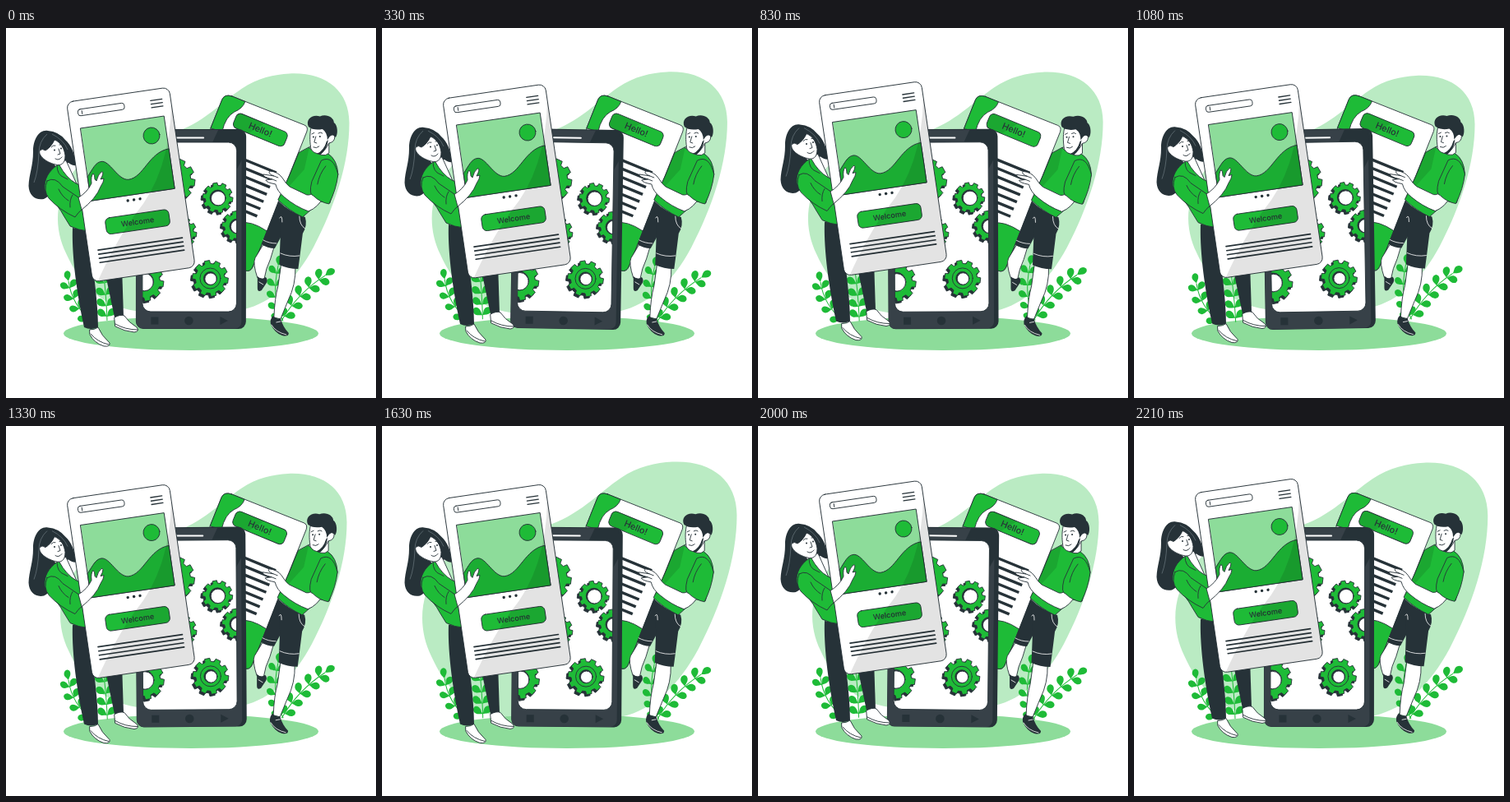
Recreate the animation shown at these times as an HTML page. Size 450 by 450 pixels, loop 2250 ms.

```html
<!DOCTYPE html>
<html lang="en">
<head>
<meta charset="utf-8">
<title>App design</title>
<style>
html, body { margin: 0; width: 100%; height: 100%; overflow: hidden; background: #fff; }
svg { display: block; width: 100%; height: 100%; }
text { font: 500 9.1px Inter, "Open Sans", sans-serif; text-anchor: middle; fill: #263238; }
.d { fill: #263238; }
.g { fill: #1ebb37; }
.w { fill: #fff; }
.o { stroke: #263238; stroke-width: .9; stroke-linejoin: round; stroke-linecap: round; }
.l { fill: none; stroke: #263238; stroke-width: .9; stroke-linecap: round; stroke-linejoin: round; }
.p { fill: none; stroke: #fff; stroke-width: .8; stroke-linecap: round; }
.s { fill: #000; opacity: .11; }
</style>
</head>
<body>
<svg viewBox="0 0 450 450">
  <defs>
    <clipPath id="screen"><rect x="166" y="139" width="114.5" height="206" rx="10"/></clipPath>
    <clipPath id="page"><rect width="126" height="221" rx="8"/></clipPath>
  </defs>

  <path id="blob" fill="#baebc3" d="M343 58C386 56 414.500 78 414.500 117C414.500 165 397 217 372 265C350 306 322 332 288 340C255 350 200 347 160 342C115 335 92 308 76 273C62 244 61 208 85 175C110 140 155 141 203 129C238 119 262 92 286 76C305 63 325 59 343 58Z"/>
  <ellipse cx="225" cy="371.5" rx="155" ry="20.5" fill="#8ddc9a"/>
  <g id="plants"></g>

  <g id="man">
    <path class="w o" d="M275 83L363 118Q368 120 366 126L300 291Q297 297 291 295L240 270L249 122L263 87Q266 80 275 83Z"/>
    <path class="g o" d="M275 83L291 89.500Q288 98 278 102Q267 108 263 126L249 122L263 87Q266 80 275 83Z"/>
    <path class="g o" d="M285 237Q298 234 317.5 247L300 291Q297 297 291 295L285 290Z"/>
    <g id="rows"></g>
    <g transform="translate(309.5 124) rotate(22.5)">
      <rect class="g o" x="-33.5" y="-9.5" width="67" height="19" rx="5.5"/>
      <path class="s" d="M-33 -4Q-33 -9.500 -28 -9.500H2L-12 9.500H-28Q-33 9.500 -33 4Z"/>
      <text y="3.5" style="font-size:10.800px">Hello!</text>
    </g>
    <path class="w o" d="M313 264L326 267Q322 282 317 293L314 306L306 304Q300 286 303 280Z"/>
    <path class="d" d="M306 302Q311 307 316 303Q319 306 317 310L311 319Q306 322 306 316Z"/>
    <path class="p" d="M308 309L313 312"/>
    <path class="w o" d="M335 288L352 290Q353 312 343 332L334 354L326 352Q327 328 331 314Z"/>
    <path class="d" d="M325 350Q329 355 334 353Q337 364 344 371Q344 376 336 374Q327 371 322 360Q321 354 325 350Z"/>
    <path class="p" d="M323 361Q328 370 341 373M329 358L334 357"/>
    <path class="d" d="M331 211L311 263Q318 268 327 268L340 244Z"/>
    <path class="d" d="M331 210Q345 224 364 230Q367 240 361 250L357.500 278L355.500 293Q343 293 332.500 288L334 250Z"/>
    <path class="p" d="M334 274Q345 279 357 277M313 258Q320 262 329 262M336 236Q336 226 333 231M357 229Q357 240 364 244"/>
    <path class="g o" d="M369 145L392 153Q403 160 404 178L394 213L383 211L370 222L361 230Q344 222 331 209L345 179L356 152Z"/>
    <path class="s" d="M369 145L363 172L344 193L331 209L345 179L356 152Z"/>
    <path class="w o" d="M372 143L393 136L393 152Q386 160 369 146Z"/>
    <path class="w o" d="M371 122C369 132 370 140 371 147Q374 153 382 153Q388 150 393 140Q400 139 400 132Q398 128 393 131L390 124Q385 120 378 122Z"/>
    <path class="d" d="M392 136Q391 147 383 154L378 153Q387 149 390 138Z"/>
    <path class="d" d="M368 120C364 111 373 104.500 382 107.500C390 104 399 109 399 115C404 118 404 130 401 133Q398 128 394 132L391 136Q391 127 385 123Q374 125 368 120Z"/>
    <path class="l" d="M372 129L375 127.500M380 128Q383 126 385 128M377 132L375 139L378 140M374 145Q378 147 381 144"/>
    <circle class="d" cx="374" cy="132.500" r="1"/><circle class="d" cx="382" cy="132" r="1"/>
    <path class="w o" d="M386 206Q380 218 368 223Q352 217 339 206Q330 199 328 190Q317 188 316 185L324 184Q312 181 313 178L326 180Q318 177 321 174Q331 175 336 182Q341 190 345 193L366 203Q372 204 375 198Z"/>
    <path class="l" d="M326 180L331 182M324 184L329 186"/>
    <path class="g o" d="M384 161Q398 154 404 178Q402 196 393 214Q382 212 374 204Q368 203 372 187Z"/>
    <path class="l" d="M389 168Q381 178 379 190"/>
  </g>

  <g id="phone">
    <rect class="d" x="158" y="123" width="134" height="243" rx="9"/>
    <rect x="158.500" y="124" width="128" height="241.500" rx="8" fill="#374148"/>
    <path class="d" d="M258 124H283Q287 124 287 132V160L280.500 172V150Q280 139 270 139H251Z"/>
    <path class="p" d="M207 133.500H240" style="stroke-width:2"/>
    <rect class="w" x="166" y="139" width="114.500" height="206" rx="10"/>
    <g id="gears" clip-path="url(#screen)"></g>
    <rect class="l" x="166" y="139" width="114.500" height="206" rx="10"/>
    <rect class="d" x="176.500" y="351.500" width="9" height="9"/>
    <circle class="d" cx="222.500" cy="356" r="5.300"/>
    <path class="d" d="M260.500 351L270 356L260.500 361Z"/>
  </g>

  <g id="woman">
    <path class="d" d="M118 285L132 352L143 351L141 290Z"/>
    <path class="w o" d="M132 352Q139 348 144 350Q149 358 159 364Q163 369 156 370Q144 369 133 363Z"/>
    <path class="l" d="M133 360Q145 367 160 367"/>
    <path class="d" d="M81 243C80 270 84 312 95 364Q103 368 112 364C112 340 108 310 107 300L104 247Z"/>
    <path class="w o" d="M102 367Q108 367 112 364Q116 374 126 383Q127 388 119 387Q107 383 102 373Z"/>
    <path class="l" d="M103 372Q111 382 125 385"/>
    <path class="d" d="M51 125C40 123 33 136 33 150C33 168 28 178 27.500 192C28 204 36 210 46 208C54 205 56 196 58 188L66 166L76 164Q82 168 85 167C84 154 80 143 72 136Q64 126 51 125Z"/>
    <path fill="none" stroke="#78858b" stroke-width=".6" d="M50 129Q40 138 40 152Q39 175 34 188M56 129Q70 136 75 148"/>
    <path class="w o" d="M56 163L73 161L87 192L72 181L60 168Z"/>
    <path class="g o" d="M62 167C52 174 46 184 47 196C49 206 62 212 70 228L78 241Q88 246 100 247L92 192L85 189Q73 182 65 167Z"/>
    <path class="l" d="M62 167Q62 179 71 182L75 184"/>
    <path class="w o" d="M59 136C67 139 71 147 72 155C72 165 67 168 60 166C48 163 39 155 41 149Q44 146 48 149Q55 145 59 136Z"/>
    <path class="l" d="M55 145Q57 142 60 143M65 142L68 141.500M64 147L66 153L63 154M60 159Q64 162 68 157"/>
    <circle class="d" cx="59" cy="148.500" r="1"/><circle class="d" cx="67" cy="146.500" r="1"/>

    <g id="card" transform="translate(73.500 90.300) rotate(-8.350)">
      <rect class="w o" width="126" height="221" rx="8"/>
      <rect class="w o" x="12" y="10.800" width="57" height="8" rx="3"/>
      <path class="l" d="M17 12.800V16.800"/>
      <path class="l" d="M101.500 13H115.500M101.500 17.300H115.500M101.500 21.600H115.500" style="stroke-width:1.300"/>
      <rect class="o" x="12.500" y="33.800" width="102.500" height="89.200" fill="#8ddc9a"/>
      <circle class="g o" cx="96.500" cy="55.300" r="10"/>
      <path class="o" fill="#1bad33" d="M12.500 93C20 85 24 77.500 31.500 77.500C42 77.500 48 103 61 104C80 104 90 75 115 74V123H12.500Z"/>
      <g class="d"><circle cx="56.500" cy="129.300" r="1.700"/><circle cx="64" cy="129.300" r="1.700"/><circle cx="71.500" cy="129.300" r="1.700"/></g>
      <rect class="g o" x="25.500" y="146.500" width="78" height="20" rx="5.500"/>
      <text x="64.500" y="159.700">Welcome</text>
      <path class="l" d="M12 183.500H115.500M12 188.600H115.500M12 193.700H115.500M12 198.800H115.500" style="stroke-width:1.700"/>
      <path class="s" clip-path="url(#page)" d="M126 20Q112 104 62 148Q34 177 6 221H126Z"/>
    </g>

    <path class="w o" d="M87 207Q99 200 104 189Q103 180 106 177Q108 178 108 184L110 186Q112 178 116 175Q119 174 117 180L115 184L119 183Q119 187 115 193Q110 207 91 222Z"/>
    <path class="g o" d="M50 186Q60 180 69 193L88 206L92 221Q88 224 84 230Q66 222 52 207Q45 198 50 186Z"/>
    <path class="l" d="M81 203Q77 209 78 218M64 196Q68 205 76 210"/>
  </g>
</svg>

<script>
const $ = id => document.getElementById(id);
const GREEN = '#1ebb37', DARK = '#263238';

// Leaves in pairs along a quadratic stem
function plant([ax, ay], [bx, by], [cx, cy], pairs, size) {
  const mix = (a, b, c, t) => (1 - t) ** 2 * a + 2 * t * (1 - t) * b + t * t * c;
  const leaf = (x, y, deg, s) =>
    `<path fill="${GREEN}" transform="translate(${x} ${y}) rotate(${deg}) scale(${s})" d="M0 0C.25 -.12 .35 -.36 .65 -.36Q1 -.32 1.050 0Q1 .28 .7 .3C.4 .3 .25 .1 0 0Z"/>`;
  let out = `<path d="M${ax} ${ay}Q${bx} ${by} ${cx} ${cy}" fill="none" stroke="${GREEN}" stroke-width="1"/>`;
  for (let i = 0; i <= pairs; i++) {
    const t = i === pairs ? 1 : (i + .4) / pairs;
    const x = mix(ax, bx, cx, t), y = mix(ay, by, cy, t);
    const dx = (1 - t) * (bx - ax) + t * (cx - bx), dy = (1 - t) * (by - ay) + t * (cy - by);
    const deg = Math.atan2(dy, dx) * 180 / Math.PI;
    out += i === pairs ? leaf(x, y, deg, size) : leaf(x, y, deg - 52, size) + leaf(x, y, deg + 52, size);
  }
  return out;
}

function gear(x, y, r, hole, ring) {
  const n = 10, pts = [];
  for (let i = 0; i < n; i++)
    for (const [off, k] of [[-.32, .82], [-.23, 1], [.23, 1], [.32, .82]]) {
      const a = (i + off + .2) * 2 * Math.PI / n;
      pts.push((r * k * Math.cos(a)).toFixed(2) + ' ' + (r * k * Math.sin(a)).toFixed(2));
    }
  const d = 'M' + pts.join('L') + 'Z';
  const circle = (cx, cy, rad, fill) => `<circle class="o" cx="${cx}" cy="${cy}" r="${rad}" fill="${fill}"/>`;
  return `<g transform="translate(${x} ${y})">
    <path class="d o" transform="translate(-2 2.300)" d="${d}"/>
    <path class="o" fill="${GREEN}" d="${d}"/>
    ${ring ? circle(0, 0, ring, GREEN) : ''}${circle(0, 0, hole, DARK)}${circle(.6, .6, hole - .8, '#fff')}</g>`;
}

$('plants').innerHTML =
  plant([104, 356], [80, 337], [76, 308], 4, 12) +
  plant([123, 356], [122, 320], [115, 270], 6, 13) +
  plant([337, 356], [322, 330], [331, 289], 5, 12) +
  plant([335, 356], [355, 322], [388, 301], 5, 13);

$('gears').innerHTML =
  gear(203, 185, 27, 11) + gear(213, 249, 19, 8) + gear(257.5, 206.5, 18.5, 9.5) +
  gear(281, 241, 18.5, 9) + gear(168, 308.5, 24, 11.5) + gear(248.5, 304.5, 22, 8, 12.5);

for (let i = 0; i < 7; i++) {
  const y = 158 + 10.4 * i, end = 329 - 3.9 * i;
  $('rows').innerHTML += `<path d="M285 ${y}L${end} ${y + .41 * (end - 285)}" stroke="${DARK}" stroke-width="3.400"/>`;
}

// [fraction of cycle, value]
const BEAT = [[0, 1], [.1, 1.1], [.3, 1], [.4, 1], [.5, 1.1], [.6, 1], [1, 1]];
const SWAY = [[0, 0], [.25, 1], [.75, -1], [1, 0]];
const FLOAT = [[0, 0], [.5, -9], [1, 0]];
const SHAKE = [[0, 0], [.1, -.9], [.2, 1.8], [.3, -3.6], [.4, 3.6], [.5, -3.6],
  [.6, 3.6], [.7, -3.6], [.8, 1.8], [.9, -.9], [1, 0]];
const LOOP = 2250, CYCLE = 1500, LEAD = 25;

function at(keys, p) {
  const i = Math.max(1, keys.findIndex(k => k[0] >= p));
  const [a, u] = keys[i - 1], [b, v] = keys[i];
  return u + (v - u) * (p - a) / (b - a);
}

const move = (id, value) => $(id).setAttribute('transform', value);

function draw(ms) {
  const p = (ms % LOOP + LEAD) % CYCLE / CYCLE;
  const sway = at(SWAY, p), x = at(SHAKE, p);
  move('blob', `translate(240.500 205) scale(${at(BEAT, p)}) translate(-240.500 -205)`);
  move('plants', `rotate(${sway} 233 316)`);
  move('phone', `rotate(${sway} 225 245)`);
  move('woman', `translate(0 ${at(FLOAT, p) + .3})`);
  move('man', `translate(${x} ${x * .25})`);
}

const start = performance.now();
function tick() {
  draw(performance.now() - start);
  requestAnimationFrame(tick);
}
tick();
</script>
</body>
</html>
```
